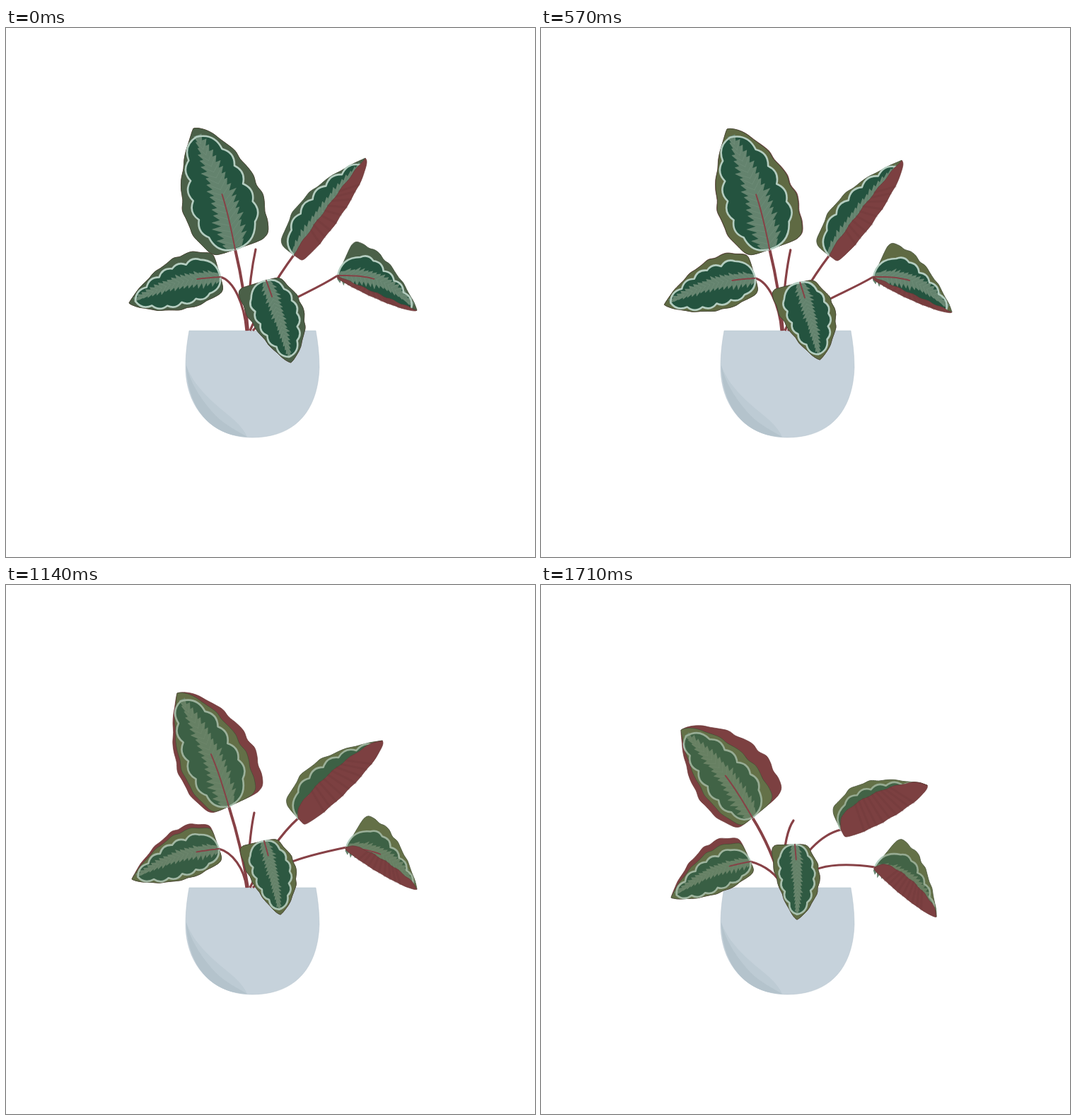
Animation, 748 px wide and 748 px high, one loop 1.9 s. Source, as an HTML page:

```html
<!DOCTYPE html>
<html lang="en">
<head>
<meta charset="utf-8">
<title>Potted plant</title>
<style>
  html, body { margin: 0; width: 100%; height: 100%; overflow: hidden; background: #fff; }
  svg { display: block; width: 100%; height: 100%; }
</style>
</head>
<body>
<svg id="stage" viewBox="0 0 748 748">
  <path fill="#c6d2db" stroke="#b3c1ca" stroke-width=".5" d="M259 428L438 428C441 445 443 462 443 480C441 540 410 579 348 579C290 579 254 535 254 480C254 460 256 445 259 428Z"/>
  <path fill="#bdcbd4" d="M255 477C262 497 276 514 295 531C310 545 332 558 341 578C290 577 256 538 255 477Z"/>
  <path fill="#b4c3cc" d="M255 477C260 500 273 521 290 541C304 558 322 567 341 578C290 577 256 538 255 477Z"/>
  <g id="plant"></g>
</svg>
<script>
const STEP = 190, STEPS = 10, MID = 6;
const RED = '#7c4041', STEM = '#874146', DARK = '#24533f', PALE = '#b4cdc0', SAGE = '#64836e';

// keys: base and tip at the start, in the middle and at the end of the droop.
// neg, pos: [width, base roundness, tip sharpness] of the half left and right of the axis.
// face, under: how far both halves of each side have narrowed or widened at the end.
// lift: height of the fold at the start and at the end.
const leaves = [
  {
    keys: [[324, 313, 265, 142], [315, 313, 242, 153], [299, 329, 198, 205]],
    neg: [52, .5, .95], pos: [61, .3, .62], face: [.62, .8], under: [.8, 1.13],
    bow: 8, rib: .44, wide: 22, haze: .4
  }, {
    keys: [[303, 352, 174, 389], [301, 373, 178, 416], [296, 391, 184, 442]],
    neg: [30, .45, .8], pos: [45, .35, .9], face: [.75, .84], under: [.75, 1.05],
    bow: 9, rib: .24, wide: 12, haze: .3
  }, {
    keys: [[407, 321, 508, 184], [413, 330, 532, 220], [424, 346, 546, 283]],
    neg: [37, .5, 1], pos: [21, .3, .5], face: [1.22, 1], lift: [2, 24],
    bow: -4, rib: 0, wide: 10, haze: .42
  }, {
    keys: [[469, 350, 581, 399], [481, 371, 581, 430], [472, 399, 559, 469]],
    neg: [55, .2, .9], pos: [8, .5, .5], face: [1, 1], lift: [-1, 18],
    bow: -17, rib: .4, wide: 13, haze: .42
  }, {
    keys: [[368, 357, 403, 473], [388 - 23, 362, 388, 466], [359, 367, 362, 473]],
    neg: [38, .6, .8], pos: [42, .15, .75], face: [.88, .76], under: [.88, .76],
    bow: -2, rib: .2, wide: 11, haze: .16, ease: .6
  }
];
const sprout = [[353, 313], [351, 322], [357, 333]];

const clamp = v => Math.min(1, Math.max(0, v));
const lerp = (a, b, t) => a + (b - a) * t;
const rand = i => { const v = Math.sin(i * 12.9898 + 4.1) * 43758.5453; return v - Math.floor(v); };
const range = (n, f) => Array.from({ length: n + 1 }, (_, i) => f(i / n, i));
const xy = p => p[0].toFixed(1) + ' ' + p[1].toFixed(1);
const path = (d, attrs) => `<path d="${d}" ${attrs}/>`;
const line = (d, color, width, extra = '') =>
  path(d, `fill="none" stroke="${color}" stroke-width="${width}" stroke-linejoin="round" stroke-linecap="round" ${extra}`);

// Slow start up to the middle key, then an even fall
const early = (step, ease = 2.7) => clamp((step - 1) / (MID - 1)) ** ease;
const late = step => clamp((step - MID) / (STEPS - 1 - MID));
const mix = ([a, b, c], step, ease) =>
  a.map((v, i) => lerp(lerp(v, b[i], early(step, ease)), c[i], late(step)));
const curl = step => .65 * early(step) + .35 * late(step);

// Bell a^m (1-a)^n scaled to a peak of 1
function bell(a, m, n) {
  const top = m / (m + n);
  return (a / top) ** m * ((1 - a) / (1 - top)) ** n;
}

// Maps [share of the axis, distance from it] to the stage
function placer([bx, by, tx, ty]) {
  const len = Math.hypot(tx - bx, ty - by), ux = (tx - bx) / len, uy = (ty - by) / len;
  return (a, p) => [bx + ux * a * len - uy * p, by + uy * a * len + ux * p];
}

function curve(p) {
  let d = '';
  for (let i = 0; i < p.length - 1; i++) {
    const a = p[Math.max(i - 1, 0)], b = p[i], c = p[i + 1], e = p[Math.min(i + 2, p.length - 1)];
    d += `C${xy([b[0] + (c[0] - a[0]) / 6, b[1] + (c[1] - a[1]) / 6])} ` +
      `${xy([c[0] - (e[0] - b[0]) / 6, c[1] - (e[1] - b[1]) / 6])} ${xy(c)}`;
  }
  return d;
}
const open = p => 'M' + xy(p[0]) + curve(p);
const between = (p, q) => open(p) + 'L' + xy(q[q.length - 1]) + curve([...q].reverse()) + 'Z';

// Wavy rim of one half, from base to tip
function edge(at, [w, m, n], side, scale) {
  return range(20, t => {
    const a = (1 - Math.cos(Math.PI * t)) / 2;
    const wave = 1 + .03 * Math.sin(a * 30 + w);
    return at(a - .05 * Math.sin(Math.PI * Math.min(1, a * 6)), side * w * scale * wave * bell(a, m, n));
  });
}

// Pale scalloped line inside one half, from base to tip
function scallop(at, [w, m, n], side, scale) {
  const p = range(6, (t, i) => {
    const a = .93 * t, ratio = i < 6 ? .7 + .1 * (rand(w + i) - .5) : 0;
    return at(a, side * w * scale * ratio * bell(a, m, n));
  });
  const arcs = p.slice(1).map((b, i) => {
    const a = p[i], dx = b[0] - a[0], dy = b[1] - a[1], k = .4 * side;
    return { c: [(a[0] + b[0]) / 2 - dy * k, (a[1] + b[1]) / 2 + dx * k], a, b };
  });
  return {
    there: 'M' + xy(p[0]) + arcs.map(s => `Q${xy(s.c)} ${xy(s.b)}`).join(''),
    back: [...arcs].reverse().map(s => `Q${xy(s.c)} ${xy(s.a)}`).join('')
  };
}

// Feathered band along the axis, with barbs that point to the tip
function feather(at, axis, wide) {
  const n = 18, sides = [[], []];
  let hairs = '';
  for (let i = 0; i <= n; i++) {
    const s = .02 + .88 * i / n, h = wide * bell(s, .18, .75);
    [1, -1].forEach((side, j) => {
      const w = h * (.8 + .4 * rand(i * 2 + j));
      sides[j].push(at(s - .01, axis(s) + side * h * .6), at(s + .04, axis(s) + side * w));
      hairs += `M${xy(at(s - .03, axis(s)))}L${xy(at(s + .04, axis(s) + side * w * .9))}`;
    });
  }
  const d = 'M' + [...sides[0], ...sides[1].reverse()].map(xy).join('L') + 'Z';
  return path(d, `fill="${SAGE}"`) + line(hairs, '#7f9c89', .8, 'opacity=".4"');
}

function drawLeaf(leaf, step) {
  const c = curl(step), at = placer(mix(leaf.keys, step, leaf.ease));
  const [fn, fp] = leaf.face.map(v => lerp(1, v, c));
  const axis = a => leaf.bow * Math.sin(Math.PI * a);
  const rim = step < 2 ? '#4b6048' : '#5f6a43';
  const red = d => path(d, `fill="${RED}" stroke="#693536" stroke-width=".7"`);
  const top = edge(at, leaf.neg, -1, fn), pale = scallop(at, leaf.neg, -1, fn);
  let out = '', rest, inner, pales = pale.there;

  if (leaf.lift) {
    const lift = lerp(...leaf.lift, c);
    rest = range(20, t => at(t, -lift * bell(t, .4, .6) + .7 * Math.sin(t * 34)));
    inner = pale.there + 'L' + xy(rest[20]) + curve([...rest].reverse()) + 'Z';
  } else {
    const [un, up] = leaf.under.map(v => lerp(1, v, c));
    const other = scallop(at, leaf.pos, 1, fp);
    rest = edge(at, leaf.pos, 1, fp);
    inner = pale.there + other.back + 'Z';
    pales += other.there;
    out += red(between(edge(at, leaf.neg, -1, un), edge(at, leaf.pos, 1, up)));
  }

  const face = between(top, rest);
  out += path(face, `fill="${rim}" stroke="#3f4a34" stroke-width=".8"`) +
    path(inner, `fill="${DARK}"`) +
    feather(at, axis, leaf.wide * (leaf.lift ? 1 : (fn + fp) / 2)) +
    line(pales, PALE, 2.6) +
    path(face, `fill="#6b7a50" opacity="${leaf.haze * clamp(c * 1.6 - .2)}"`);
  if (leaf.rib) out += line(open(range(6, t => at(t * leaf.rib, axis(t * leaf.rib)))), STEM, 2);

  if (leaf.lift) {
    const low = edge(at, leaf.pos, 1, lerp(1, .85, c));
    const shade = range(8, (t, i) => `M${xy(rest[i + 5])}L${xy(low[i + 6])}`).join('');
    out += red(between(rest, low)) + line(shade, '#693536', 3, 'opacity=".25"');
  }
  return out;
}

function drawStems(step) {
  const [a, c, b, e] = leaves.map(leaf => mix(leaf.keys, step, leaf.ease));
  const k = curl(step), stem = (d, w) => line(d, STEM, w, 'style="stroke-linecap:butt"');
  return stem(`M342 428Q${338 - (324 - a[0]) * .48} 372 ${a[0]} ${a[1]}`, 4) +
    stem(`M340 428C337 ${(428 + c[1]) / 2} ${c[0] + 19} ${c[1] + 5} ${c[0]} ${c[1]}`, 3.2) +
    stem(`M345 428Q${lerp(368, 382, k)} ${lerp(374, 356, k)} ${b[0]} ${b[1]}`, 3.2) +
    stem(`M349 428C${lerp(388, 375, k)} ${lerp(384, 403, k)} ${lerp(422, 402, k)} ${lerp(380, 389, k)} ${e[0]} ${e[1]}`, 3) +
    line(`M342 400Q345 350 ${xy(mix(sprout, step))}`, STEM, 3.2);
}

const plant = document.getElementById('plant');
const start = performance.now();
let shown = -1;
function tick() {
  const step = Math.floor((performance.now() - start) / STEP) % STEPS;
  if (step !== shown) {
    shown = step;
    plant.innerHTML = drawStems(step) + leaves.map(leaf => drawLeaf(leaf, step)).join('');
  }
  requestAnimationFrame(tick);
}
tick();
</script>
</body>
</html>
```
